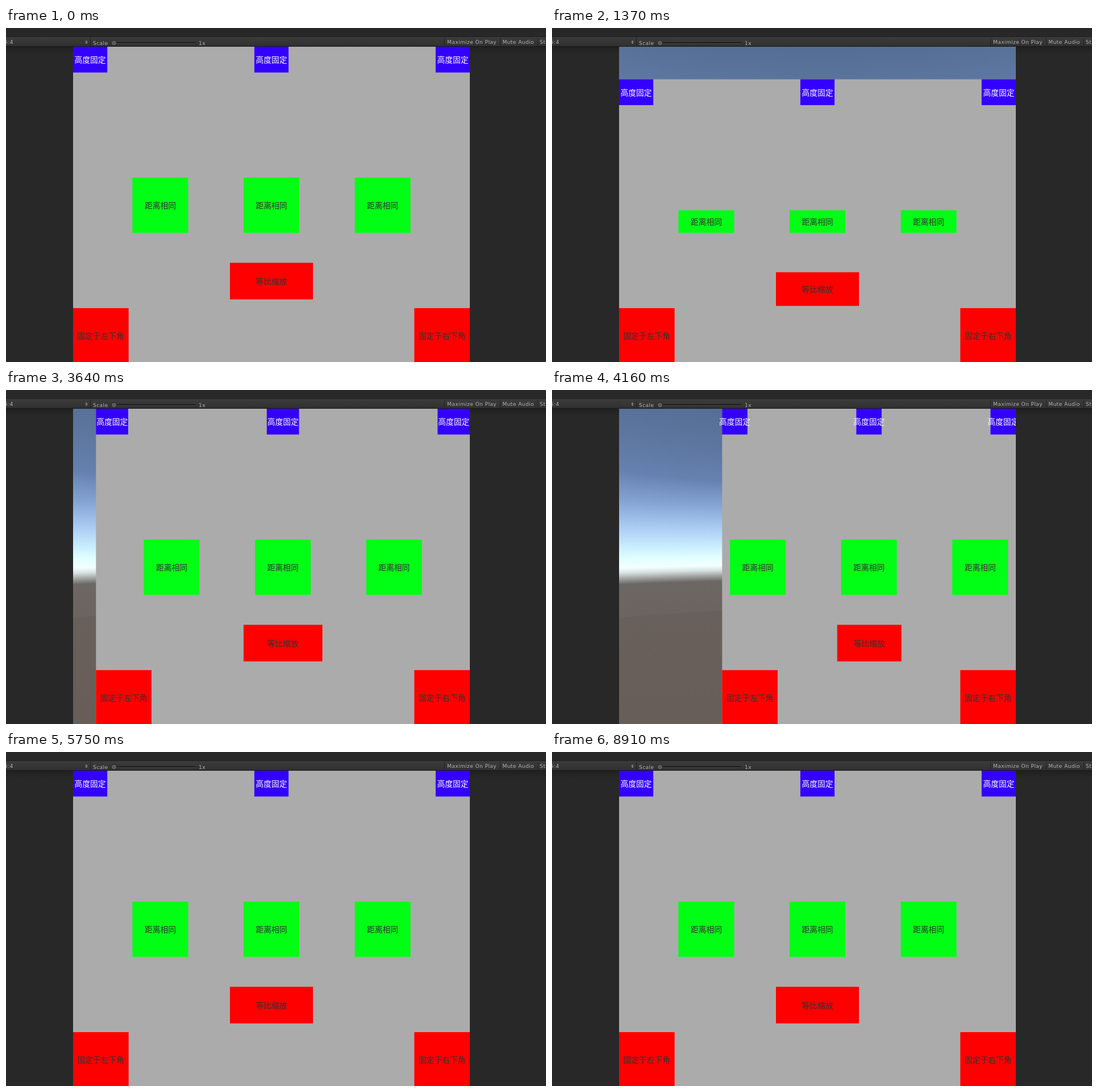
An HTML page with a canvas that plays this animation: 950 px wide and 589 px high, repeating every 9.91 s.

```html
<!DOCTYPE html>
<html lang="zh-CN">
<head>
<meta charset="utf-8">
<title>Anchored layout</title>
<style>
html, body { margin: 0; width: 100%; height: 100%; overflow: hidden; background: #282828; }
canvas { display: block; }
</style>
</head>
<body>
<canvas id="stage" width="950" height="589"></canvas>
<script>
const stage = document.getElementById('stage');
const ctx = stage.getContext('2d');
const LOOP = 9910;
const VIEW = { left: 118, top: 33, right: 816, bottom: 589 };

// Each drag: first step, last step, step count, moved edge, final position
const drags = [
  [230, 420, 6, 'top', 87],
  [570, 660, 2, 'top', 110.5],
  [840, 840, 1, 'top', 120],
  [1060, 1720, 13, 'top', 56],
  [1970, 2030, 2, 'top', 33],
  [3520, 4160, 18, 'left', 299.3],
  [4220, 4250, 2, 'left', 312],
  [4430, 4600, 6, 'left', 265],
  [4960, 5260, 7, 'left', 191.3],
  [5290, 5750, 11, 'left', 118],
  [6850, 7050, 5, 'top', 91],
  [7320, 7550, 5, 'top', 60],
  [7830, 7990, 3, 'top', 33]
];

function panelAt(t) {
  const panel = { left: VIEW.left, top: VIEW.top };
  for (const [start, end, steps, edge, to] of drags) {
    if (t < start) break;
    const gap = (end - start) / Math.max(1, steps - 1);
    const done = t >= end ? steps : Math.floor((t - start) / gap) + 1;
    panel[edge] += (to - panel[edge]) * done / steps;
  }
  return panel;
}

function rect(c, color, x, y, w, h) {
  c.fillStyle = color;
  c.fillRect(x, y, w, h);
}

function layer(paint) {
  const canvas = document.createElement('canvas');
  canvas.width = stage.width;
  canvas.height = stage.height;
  paint(canvas.getContext('2d'));
  return canvas;
}

// Sky stops: height at the middle, shift at the sides, colour
const skyStops = [
  [33, -42, '#546d93'],
  [110, -38, '#5c769f'],
  [165, -22, '#6681b0'],
  [205, -10, '#83a3d3'],
  [248, -2, '#aed0f5'],
  [278, 2, '#cdf0ff'],
  [294, 4, '#e2ffff'],
  [308, 6, '#f4ffff'],
  [316, 7, '#d7e2e2'],
  [325, 8, '#a2a5a3'],
  [335, 8, '#6d6764'],
  [385, 16, '#6b6460'],
  [386, 16, '#68605a'],
  [589, 0, '#665e57']
];

const sky = layer(c => {
  const middle = (VIEW.left + VIEW.right) / 2;
  for (let x = VIEW.left; x < VIEW.right; x++) {
    const bend = ((x - middle) / (middle - VIEW.left)) ** 2;
    const column = c.createLinearGradient(0, -20, 0, 600);
    for (const [y, shift, color] of skyStops) {
      column.addColorStop((y + shift * bend + 20) / 620, color);
    }
    rect(c, column, x, VIEW.top, 1, VIEW.bottom - VIEW.top);
  }
});

function triangle(c, x, y, h) {
  c.beginPath();
  c.moveTo(x - 2, y);
  c.lineTo(x + 2, y);
  c.lineTo(x, y + h);
  c.fill();
}

const frame = layer(c => {
  rect(c, '#282828', 0, 0, 950, 589);
  const shade = c.createLinearGradient(0, 33, 0, 46);
  shade.addColorStop(0, '#202020');
  shade.addColorStop(1, '#282828');
  rect(c, shade, 0, 33, 950, 13);

  const bar = c.createLinearGradient(0, 16, 0, 32);
  bar.addColorStop(0, '#3c3c3c');
  bar.addColorStop(1, '#303030');
  rect(c, bar, 0, 16, 950, 16);
  rect(c, '#222222', 0, 15, 950, 1);
  rect(c, '#191919', 0, 32, 950, 1);
  for (const x of [148, 771, 869, 935]) rect(c, '#232323', x, 17, 1, 15);

  c.font = '9px "DejaVu Sans", sans-serif';
  c.letterSpacing = '0.45px';
  c.fillStyle = '#b4b4b4';
  const labels = [
    ['5:4', -3, 28], ['Scale', 153, 29.5], ['1x', 339, 29.5],
    ['Maximize On Play', 776, 28], ['Mute Audio', 873.5, 28], ['Stats', 939, 28]
  ];
  for (const [text, x, y] of labels) c.fillText(text, x, y);

  c.fillStyle = '#999999';
  triangle(c, 141.5, 24.5, -2.5);
  triangle(c, 141.5, 25.5, 2.5);

  rect(c, '#1d1d1d', 190, 25, 143, 2);
  rect(c, '#4a4a4a', 190, 27, 143, 1);
  c.beginPath();
  c.arc(190, 26.5, 4.7, 0, Math.PI * 2);
  c.fillStyle = '#5a5a5a';
  c.fill();
  c.strokeStyle = '#202020';
  c.stroke();
});

function box(color, textColor, text, left, top, right, bottom) {
  rect(ctx, color, left, top, right - left, bottom - top);
  ctx.fillStyle = textColor;
  ctx.fillText(text, (left + right) / 2, (top + bottom) / 2 + 5.3);
}

function drawPanel({ left, top }) {
  const { right } = VIEW;
  const width = right - left;
  const middle = (left + right) / 2;
  const dx = left - VIEW.left;
  const dy = top - VIEW.top;
  const dark = '#323232';

  rect(ctx, '#ababab', left, top, width, VIEW.bottom - top);
  ctx.font = '13.75px "Noto Sans CJK SC", "Noto Sans CJK", sans-serif';
  ctx.textAlign = 'center';

  // Top row: width follows the panel, height stays
  const tab = width * 0.0862;
  for (const x of [left, middle - tab / 2, right - tab]) {
    box('#3300ff', '#ffffff', '高度固定', x, top, x + tab, top + 45.5);
  }

  // Middle row: equal spacing, stretched vertically
  for (const i of [-1, 0, 1]) {
    const x = middle + i * 195.6;
    box('#00ff14', dark, '距离相同', x - 49, top + 231, x + 49, 361.3);
  }

  box('#ff0000', dark, '等比缩放',
    394 + dx * 0.594, 414 + dy * 0.29, 540 + dx * 0.412, 478.6 + dy * 0.2);

  // Corners
  box('#ff0000', dark, '固定于左下角', left, 494, left + 97.7, 591.6);
  box('#ff0000', dark, '固定于右下角', right - 97.7, 494, right, 591.6);
}

function draw(now) {
  ctx.drawImage(frame, 0, 0);
  ctx.save();
  ctx.beginPath();
  ctx.rect(VIEW.left, VIEW.top, VIEW.right - VIEW.left, VIEW.bottom - VIEW.top);
  ctx.clip();
  ctx.drawImage(sky, 0, 0);
  drawPanel(panelAt(now % LOOP));
  ctx.restore();
  requestAnimationFrame(draw);
}

draw(performance.now());
</script>
</body>
</html>
```
